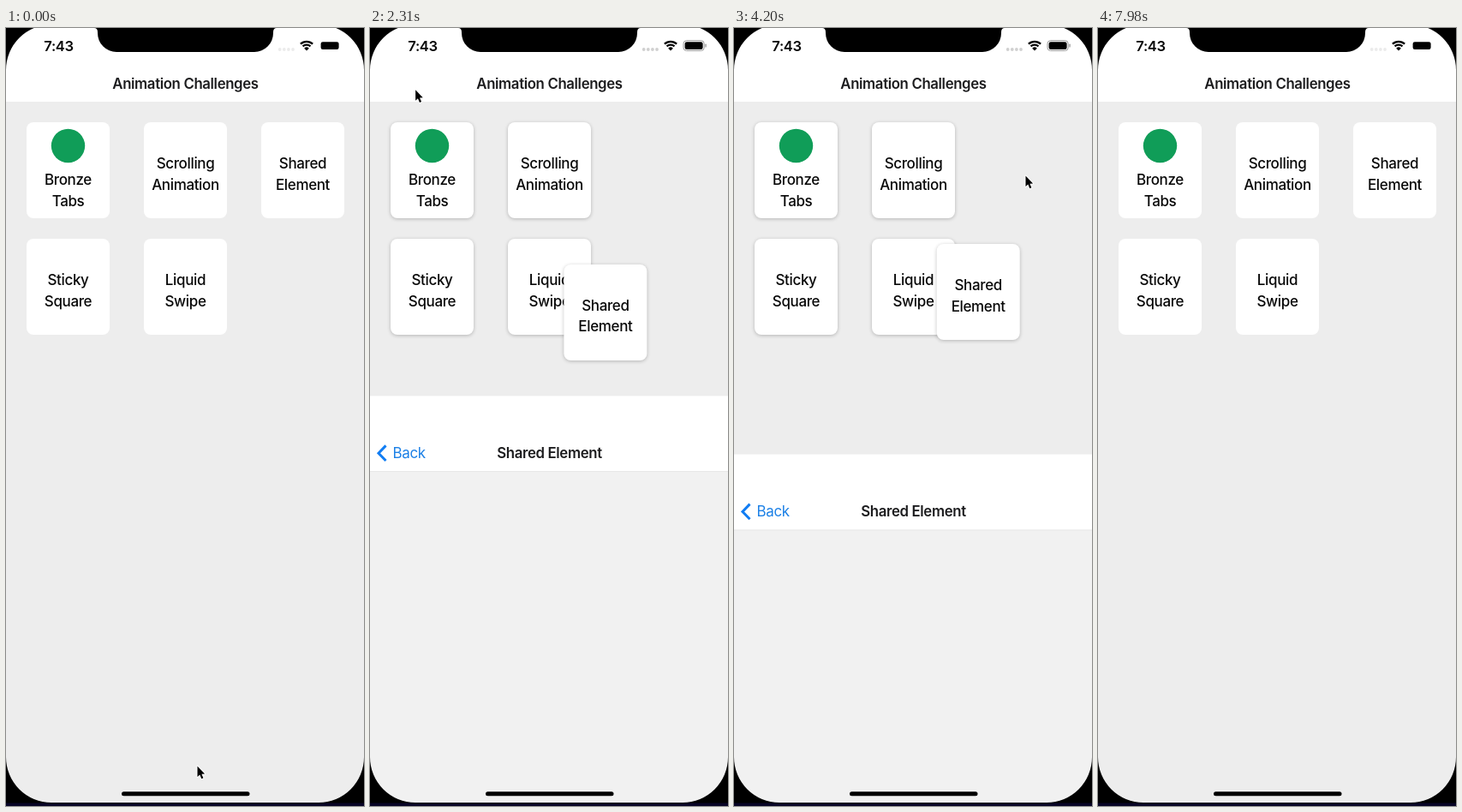
Write an HTML page with a canvas that moves like this. It is 418 by 908 pixels and loops after 8.05 s.

```html
<!DOCTYPE html>
<html lang="en">
<head>
<meta charset="utf-8">
<title>Animation Challenges</title>
<style>
  html, body { margin: 0; width: 100%; height: 100%; overflow: hidden; background: #000; }
  canvas { display: block; width: 418px; height: 908px; }
</style>
</head>
<body>
<canvas id="stage"></canvas>
<script>
const W = 418, H = 908, SCREEN_H = 904, LOOP = 8050, STEP = 70;
const canvas = document.getElementById('stage');
const ratio = window.devicePixelRatio || 1;
canvas.width = W * ratio;
canvas.height = H * ratio;
const ctx = canvas.getContext('2d');
ctx.scale(ratio, ratio);

const CARD = { w: 97, h: 112, r: 8 };
const HOME_SPOT = [298, 110], DETAIL_SPOT = [161, 427.5];
const SHARED = ['Shared', 'Element'];
const CARDS = [
  { x: 24, y: 110, lines: ['Bronze', 'Tabs'], icon: true },
  { x: 161, y: 110, lines: ['Scrolling', 'Animation'] },
  { x: 24, y: 246, lines: ['Sticky', 'Square'] },
  { x: 161, y: 246, lines: ['Liquid', 'Swipe'] }
];

// Start time and resting value of each page transition.
const MOVES = [[1075, 1], [2222, 0], [4117, 1], [5400, 0]];

// Pointer path: time, x, y. Repeated places are pauses.
const POINTER = [
  [0, 223, 861], [35, 223, 861], [840, 346, 160], [890, 346, 160],
  [980, 340, 172], [1150, 340, 172], [1540, 191, 148], [1890, 52, 72],
  [2100, 52, 72], [2660, 54, 71], [2730, 54, 71], [3500, 354, 149],
  [3740, 354, 149], [3920, 340, 172], [4200, 340, 172], [4830, 61, 90],
  [5110, 45, 65], [5250, 45, 65], [5950, 45, 58], [6020, 45, 58],
  [6230, 180, 45], [6480, 362, 350], [6720, 330, 912], [LOOP, 330, 912]
];

// Critically damped spring, stiffness 1000 and mass 3.
function spring(ms) {
  const k = Math.sqrt(1000 / 3) * ms / 1000;
  return 1 - Math.exp(-k) * (1 + k);
}

function pageProgress(t) {
  const move = MOVES.filter(m => m[0] <= t).pop();
  if (!move) return 0;
  const s = spring(t - move[0]);
  return move[1] ? s : 1 - s;
}

function slope(i, axis) {
  const a = POINTER[i - 1], b = POINTER[i], c = POINTER[i + 1];
  if (!a || !c) return 0;
  const still = (p, q) => p[1] === q[1] && p[2] === q[2];
  if (still(a, b) || still(b, c)) return 0;
  return (c[axis] - a[axis]) / (c[0] - a[0]);
}

function pointerAt(t) {
  const i = POINTER.findIndex((p, n) => n === POINTER.length - 2 || POINTER[n + 1][0] > t);
  const a = POINTER[i], b = POINTER[i + 1], d = b[0] - a[0];
  const u = (t - a[0]) / d, v = 1 - u;
  return [1, 2].map(n =>
    a[n] * (1 + 2 * u) * v * v + b[n] * u * u * (3 - 2 * u) +
    d * (slope(i, n) * u * v * v - slope(i + 1, n) * u * u * v));
}

function box(x, y, w, h, r, fill) {
  ctx.beginPath();
  ctx.roundRect(x, y, w, h, r);
  ctx.fillStyle = fill;
  ctx.fill();
}

function dot(x, y, r, fill) {
  ctx.beginPath();
  ctx.arc(x, y, r, 0, Math.PI * 2);
  ctx.fillStyle = fill;
  ctx.fill();
}

function text(str, x, y, weight, size, color, align = 'center') {
  ctx.font = `${weight} ${size}px Inter, sans-serif`;
  ctx.letterSpacing = '-0.36px';
  ctx.textAlign = align;
  ctx.fillStyle = color;
  ctx.fillText(str, x, y);
}

function drawCard({ x, y, lines, icon }, shaded) {
  ctx.save();
  if (shaded) {
    ctx.shadowColor = 'rgba(0,0,0,.24)';
    ctx.shadowBlur = 4 * ratio;
    ctx.shadowOffsetY = ratio;
  }
  box(x, y, CARD.w, CARD.h, CARD.r, '#fff');
  ctx.restore();
  if (icon) dot(x + 48.5, y + 27.5, 19.7, '#109d58');
  const base = y + (icon ? 73 : 54);
  lines.forEach((line, i) => text(line, x + 48.5, base + i * 24.5, 500, 17, '#080808'));
}

function drawHome(shaded) {
  ctx.fillStyle = '#ededed';
  ctx.fillRect(0, 0, W, H);
  ctx.fillStyle = '#fff';
  ctx.fillRect(0, 0, W, 86);
  text('Animation Challenges', 209.5, 70.5, 600, 16.8, '#1c1c1e');
  CARDS.forEach(card => drawCard(card, shaded));
}

function drawDetail(top) {
  ctx.save();
  ctx.translate(0, top);
  ctx.fillStyle = '#f1f1f1';
  ctx.fillRect(0, 0, W, H);
  ctx.fillStyle = '#fff';
  ctx.fillRect(0, -2, W, 88);
  ctx.fillStyle = '#e0e0e0';
  ctx.fillRect(0, 86, W, .7);
  ctx.beginPath();
  ctx.moveTo(18.5, 56);
  ctx.lineTo(10, 64.8);
  ctx.lineTo(18.5, 73.6);
  ctx.strokeStyle = '#117df3';
  ctx.lineWidth = 3;
  ctx.stroke();
  text('Back', 26.5, 70.5, 400, 17, '#1c80e6', 'left');
  text('Shared Element', 209.5, 70.5, 600, 16.8, '#1c1c1e');
  ctx.restore();
}

function drawStatus(detailed) {
  text('7:43', 61.5, 26.5, 600, 16.6, '#080808');
  for (let i = 0; i < 4; i++) dot(319.7 + i * 5.1, 25, 1.9, detailed ? '#d0d0d0' : '#ebebeb');

  // Wireless signal
  ctx.strokeStyle = '#000';
  ctx.lineWidth = 2.3;
  for (const r of [6.4, 10.2]) {
    ctx.beginPath();
    ctx.arc(351, 26, r, -Math.PI * .745, -Math.PI * .255);
    ctx.stroke();
  }
  ctx.beginPath();
  ctx.moveTo(351, 26.6);
  ctx.arc(351, 26.6, 4, -Math.PI * .75, -Math.PI * .25);
  ctx.closePath();
  ctx.fillStyle = '#000';
  ctx.fill();

  // Battery
  if (detailed) {
    ctx.beginPath();
    ctx.roundRect(366, 14.7, 24.2, 11.8, 3.6);
    ctx.strokeStyle = '#999';
    ctx.lineWidth = 1;
    ctx.stroke();
    box(391.4, 18.6, 1.3, 4, .7, '#999');
  }
  box(367.6, 16.3, 21, 8.6, 2.2, '#000');
}

function drawBezel() {
  ctx.beginPath();
  ctx.rect(0, 0, W, H);
  ctx.roundRect(0, -4, W, SCREEN_H + 4, 53);
  ctx.fillStyle = '#000';
  ctx.fill('evenodd');
  ctx.fillStyle = '#080526';
  ctx.fillRect(0, SCREEN_H + .5, W, H - SCREEN_H);

  // Notch
  ctx.beginPath();
  ctx.moveTo(103, 0);
  ctx.quadraticCurveTo(107, 0, 107, 5);
  ctx.arcTo(107, 28, 130, 28, 22);
  ctx.arcTo(312, 28, 312, 5, 22);
  ctx.lineTo(312, 5);
  ctx.quadraticCurveTo(312, 0, 316, 0);
  ctx.closePath();
  ctx.fillStyle = '#000';
  ctx.fill();

  box(135, 891.3, 149.5, 5, 2.5, '#000');
}

function drawPointer([x, y]) {
  if (y > SCREEN_H) return;
  ctx.save();
  ctx.translate(x, y);
  ctx.beginPath();
  ctx.moveTo(.5, .5);
  ctx.lineTo(.5, 13);
  ctx.lineTo(3.3, 10.5);
  ctx.lineTo(5.3, 15.2);
  ctx.lineTo(7.4, 14.3);
  ctx.lineTo(5.4, 9.8);
  ctx.lineTo(9.1, 9.6);
  ctx.closePath();
  ctx.lineJoin = 'round';
  ctx.lineWidth = 2;
  ctx.strokeStyle = '#fff';
  ctx.stroke();
  ctx.fillStyle = '#000';
  ctx.fill();
  ctx.restore();
}

function draw(t) {
  const p = pageProgress(t);
  const detailed = p > .01;
  drawHome(detailed);
  if (p > .0005) drawDetail((1 - p) * SCREEN_H);
  const [x, y] = HOME_SPOT.map((v, i) => v + (DETAIL_SPOT[i] - v) * p);
  drawCard({ x, y, lines: SHARED }, detailed);
  drawStatus(detailed);
  drawBezel();
  drawPointer(pointerAt(t));
}

const start = performance.now();
function frame() {
  const t = (performance.now() - start) % LOOP;
  draw(Math.floor(t / STEP) * STEP);
  requestAnimationFrame(frame);
}
frame();
</script>
</body>
</html>
```
